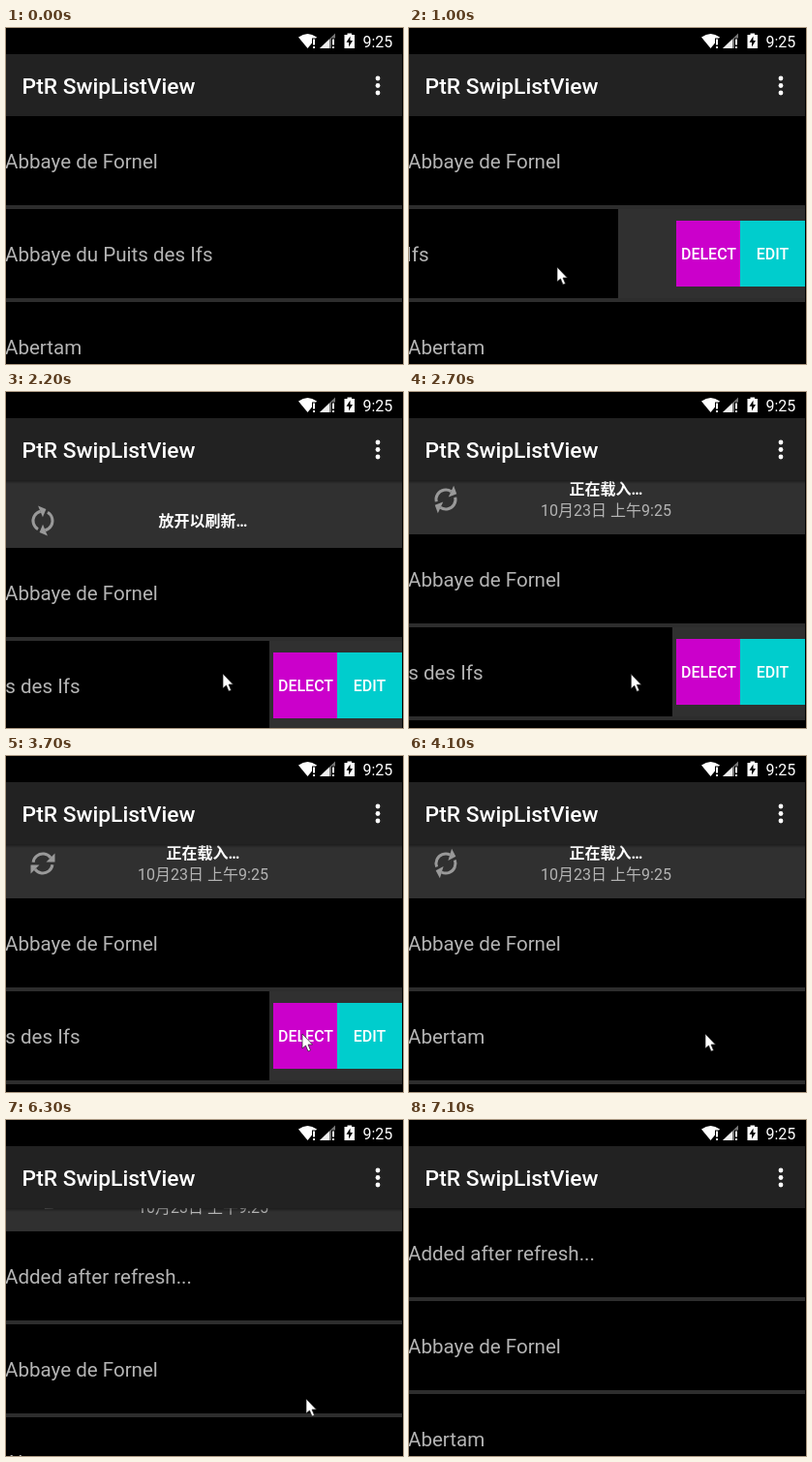
An HTML page with a canvas for the animation above (7.8 s loop, 410x347 px).

```html
<!DOCTYPE html>
<html lang="en">
<head>
<meta charset="utf-8">
<title>PtR SwipListView</title>
<style>
html, body { margin: 0; width: 410px; height: 347px; overflow: hidden; background: #000; }
canvas { display: block; }
</style>
</head>
<body>
<canvas id="stage" width="410" height="347"></canvas>
<script>
const ctx = document.getElementById('stage').getContext('2d');
const LOOP = 7800, STEP = 100;
const WIDTH = 409, TOP = 91, ROW = 92, PITCH = 96;
const FONT = 'Roboto, "Noto Sans CJK SC", "Noto Sans CJK", sans-serif';
const GREY = '#303030', DIM = '#b4b4b4';
const FIRST = 'Abbaye de Fornel', SECOND = 'Abbaye du Puits des Ifs', THIRD = 'Abertam';
const DELETED = 4100, LOADING = 2300, LOADED = 6200;

// Keyframes: [time, value, ...]
const swipeKeys = [[430, 0], [1000, -193], [1100, -151], [1200, -137]];
const pullKeys = [[1600, 0], [1800, 13], [2200, 70], [2300, 75], [2400, 61], [2500, 56],
  [6200, 56], [6300, 24], [6400, 6], [6500, 0]];
const cursorKeys = [[100, 379, 164], [300, 357, 245], [400, 357, 245], [1000, 153, 247],
  [1200, 210, 166], [1300, 224, 164], [1500, 224, 166], [1800, 224, 213], [2200, 224, 291],
  [2300, 224, 298], [2500, 224, 298], [2800, 232, 288], [3500, 306, 287], [4500, 306, 287],
  [4900, 310, 288], [6600, 310, 288], [6800, 311, 272], [7000, 390, 166]];

function at(keys, t) {
  const i = keys.findIndex(k => k[0] > t);
  if (i === 0) return keys[0].slice(1);
  if (i < 0) return keys[keys.length - 1].slice(1);
  const a = keys[i - 1], b = keys[i], p = (t - a[0]) / (b[0] - a[0]);
  return a.slice(1).map((v, n) => v + (b[n + 1] - v) * p);
}

function box(color, x, y, w, h) {
  ctx.fillStyle = color;
  ctx.fillRect(x, y, w, h);
}

function text(str, x, y, size, color = '#fff', weight = 400, align = 'left') {
  ctx.font = `${weight} ${size}px ${FONT}`;
  ctx.fillStyle = color;
  ctx.textAlign = align;
  ctx.fillText(str, x, y);
}

function shape(color, ...pts) {
  ctx.fillStyle = color;
  ctx.beginPath();
  pts.forEach(p => ctx.lineTo(...p));
  ctx.closePath();
  ctx.fill();
}

function spinner(x, y, degrees) {
  ctx.save();
  ctx.translate(x, y);
  ctx.rotate(degrees * Math.PI / 180);
  ctx.strokeStyle = '#999';
  ctx.lineWidth = 3;
  for (let i = 0; i < 2; i++) {
    ctx.beginPath();
    ctx.arc(0, 0, 10, Math.PI * 1.04, Math.PI * 1.8);
    ctx.stroke();
    shape('#999', [12.5, -10.5], [12.5, -1.5], [3.5, -1.5]);
    ctx.rotate(Math.PI);
  }
  ctx.restore();
}

function header(t, pull, listTop) {
  box(GREY, 0, TOP, WIDTH, pull);
  if (t >= LOADING) {
    const y = listTop - 36;
    spinner(38, y, (t - 3700) / STEP * 38);
    text('正在载入…', 203.5, y - 5, 16, '#fff', 700, 'center');
    text('10月23日 上午9:25', 203.5, y + 17, 16, DIM, 400, 'center');
  } else {
    const y = listTop - 28;
    spinner(38, y, pull / 56 * 90);
    text(pull < 56 ? '下拉刷新…' : '放开以刷新…', 203.5, y + 6, 16, '#fff', 700, 'center');
  }
}

function row(label, y, shift) {
  if (shift) {
    box(GREY, 0, y, WIDTH, ROW);
    box('#cb00cb', 276, y + 12, 66, 68);
    box('#00cdcd', 342, y + 12, 67, 68);
    text('DELECT', 309.5, y + 52, 16, '#fff', 500, 'center');
    text('EDIT', 375.5, y + 52, 16, '#fff', 500, 'center');
  }
  box('#000', shift, y, WIDTH, ROW);
  text(label, shift - 1, y + 54, 20.57, DIM);
  box('#2d2d2d', 0, y + ROW, WIDTH, PITCH - ROW);
}

function bars() {
  box('#000', 0, 0, 410, 27);
  box('#222', 0, 27, WIDTH, TOP - 27);
  const shade = ctx.createLinearGradient(0, TOP, 0, TOP + 4);
  shade.addColorStop(0, 'rgba(0,0,0,.4)');
  shade.addColorStop(1, 'rgba(0,0,0,0)');
  box(shade, 0, TOP, WIDTH, 4);
  text('PtR SwipListView', 16.5, 68, 22.8, '#fff', 500);
  for (const y of [52, 59.5, 67]) {
    ctx.beginPath();
    ctx.arc(384, y, 2.4, 0, 7);
    ctx.fill();
  }

  // Wi-Fi, signal, battery, clock
  ctx.beginPath();
  ctx.moveTo(302, 9.5);
  ctx.quadraticCurveTo(311.5, 2.5, 321, 9.5);
  ctx.lineTo(311.5, 21);
  ctx.fill();
  shape('#777', [324, 21], [340, 21], [340, 5.5]);
  shape('#eee', [324, 21], [334, 21], [334, 11.5]);
  for (const x of [317, 337]) {
    box('#000', x - 1, 10.5, 4, 11);
    box('#fff', x, 11.5, 2, 6);
    box('#fff', x, 19, 2, 2);
  }
  box('#fff', 349.5, 7, 10.5, 14);
  box('#fff', 352.5, 5.5, 4.5, 2);
  shape('#000', [355.5, 8.5], [351.5, 14.7], [354, 14.7], [354, 19.5], [358, 13], [355.5, 13]);
  text('9:25', 368.5, 20, 16);
}

function cursor(x, y) {
  ctx.save();
  ctx.translate(x, y);
  shape('#fff', [0, 0], [0, 15], [3.5, 12], [6, 18], [8.5, 17], [6, 11], [10.5, 11]);
  ctx.strokeStyle = '#222';
  ctx.lineWidth = .7;
  ctx.stroke();
  ctx.restore();
}

function draw(t) {
  const [pull] = at(pullKeys, t).map(Math.round);
  const [swipe] = at(swipeKeys, t).map(Math.round);
  const listTop = TOP + pull;
  const rows = t < DELETED ? [FIRST, SECOND, THIRD]
    : t < LOADED ? [FIRST, THIRD, '']
    : ['Added after refresh...', FIRST, THIRD];
  box('#000', 0, 0, 410, 347);
  if (pull) header(t, pull, listTop);
  rows.forEach((label, i) => row(label, listTop + i * PITCH, label === SECOND ? swipe : 0));
  bars();
  if (t >= 100 && t < 7100) cursor(...at(cursorKeys, t));
}

const start = performance.now();
function tick() {
  const t = (performance.now() - start) % LOOP;
  draw(Math.floor(t / STEP) * STEP);
  requestAnimationFrame(tick);
}
tick();
</script>
</body>
</html>
```
